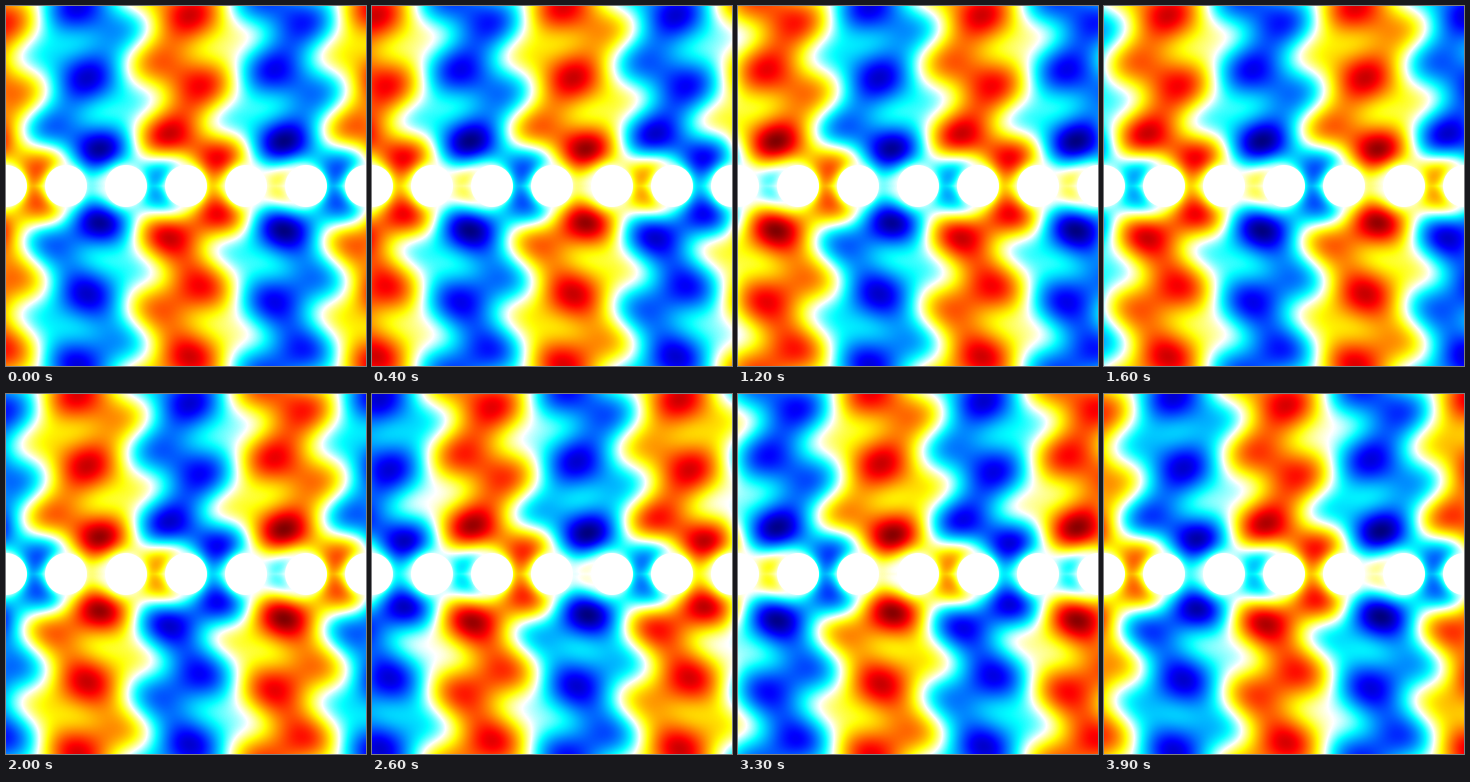
Animation, 360 px wide and 360 px high, one loop 4 s. Source, as a matplotlib script:

```python
import numpy as np
import matplotlib.pyplot as plt
from matplotlib.animation import FuncAnimation
from matplotlib.colors import LinearSegmentedColormap
from matplotlib.patches import Circle

SIZE = 360
FRAMES = 40
PITCH = 60          # spacing of the cylinders
WAVELENGTH = 200    # of the wave running along the row
RADIUS = 21
TAU = 2 * np.pi

cmap = LinearSegmentedColormap.from_list("white_jet", [
    (0, (0, 0, 0.5)), (0.125, (0, 0, 1)), (0.375, (0, 1, 1)), (0.5, (1, 1, 1)),
    (0.625, (1, 1, 0)), (0.875, (1, 0, 0)), (1, (0.5, 0, 0))], N=512)


def cycles(c):
    return np.exp(1j * TAU * c)


axis = np.arange(SIZE) + 0.5
x, y = np.meshgrid(axis, axis)
dist = np.abs(y - SIZE / 2)


def envelope():
    """Complex Bloch envelope: plane wave, two diffracted orders, gap field."""
    gain = 0.125 * (1 + 1.2 * np.exp(-(dist / 55) ** 2))
    straight = cycles(0.0156 * (dist - 45))
    oblique = cycles(-x / PITCH + 0.0115 * dist + 0.111)
    gap = (-0.31 - 0.55j) * np.exp(-(dist / 22) ** 2)
    return 0.6 + gain * (straight + oblique) + gap


def edge_fade():
    """The field drops to zero at each cylinder."""
    fade = np.ones_like(x)
    for cx in range(0, SIZE + 1, PITCH):
        r = np.hypot(x - cx, dist)
        fade *= 1 - np.exp(-np.maximum(r - 19, 0) / 5)
    return fade


mode = -envelope() * edge_fade() * cycles((x - 80) / WAVELENGTH)


def field(n):
    return (mode * cycles(-n / FRAMES)).real


fig = plt.figure(figsize=(3.6, 3.6), dpi=100)
ax = fig.add_axes([0, 0, 1, 1])
ax.axis("off")
image = ax.imshow(field(0), cmap=cmap, vmin=-1, vmax=1,
                  extent=(0, SIZE, SIZE, 0), interpolation="nearest")
for cx in range(0, SIZE + 1, PITCH):
    ax.add_patch(Circle((cx, SIZE / 2), RADIUS, color="white", lw=0))
ax.set_xlim(0, SIZE)
ax.set_ylim(SIZE, 0)


def update(n):
    image.set_data(field(n))
    return [image]


anim = FuncAnimation(fig, update, frames=FRAMES, interval=100, repeat=True)
plt.show()
```
